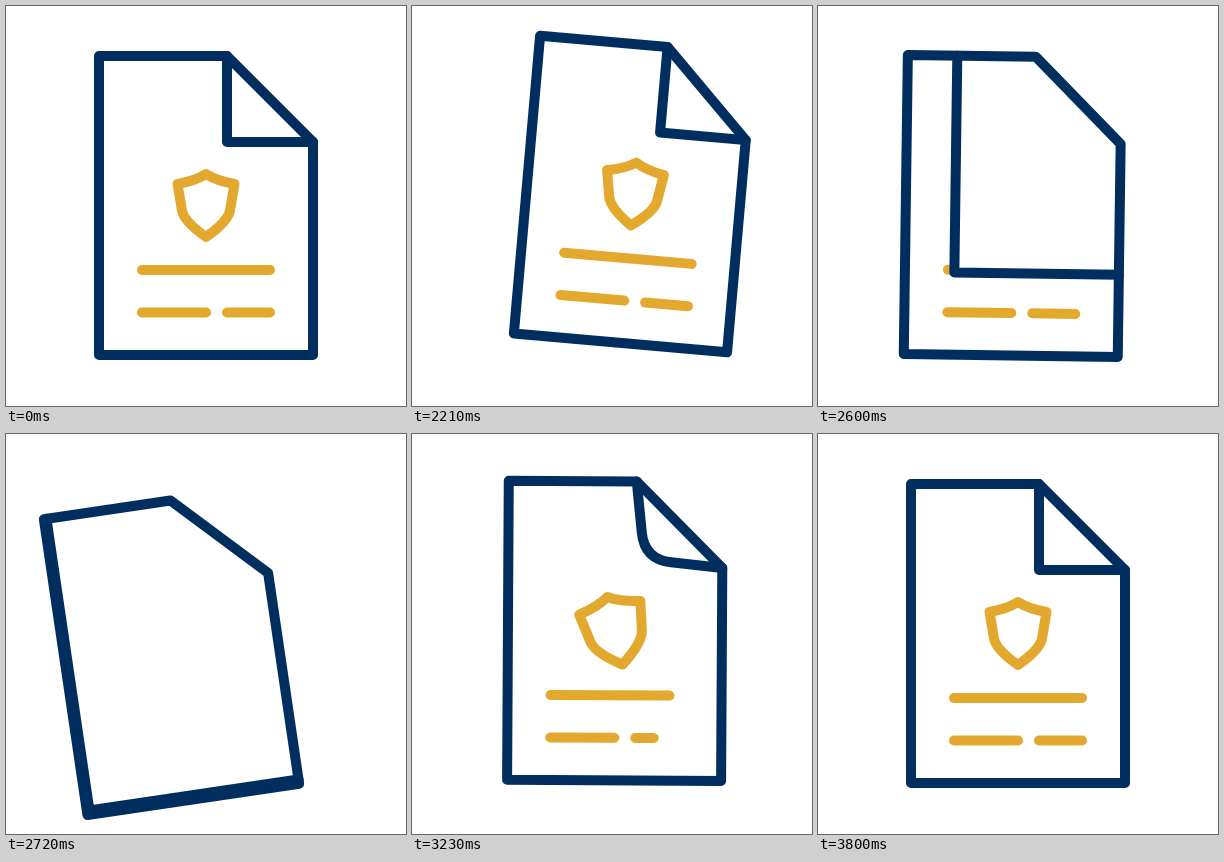
Animation, 400 px wide and 400 px high, one loop 3860 ms. Source, as an HTML page with a canvas:

```html
<!DOCTYPE html>
<html lang="en">
<head>
<meta charset="utf-8">
<title>Document turning a page</title>
<style>
html, body { margin: 0; width: 100%; height: 100%; overflow: hidden; background: #fff; }
canvas { display: block; width: 400px; height: 400px; }
</style>
</head>
<body>
<canvas width="400" height="400"></canvas>
<script>
const ctx = document.querySelector('canvas').getContext('2d');
const NAVY = '#002e5f', GOLD = '#e2a92e';
const LOOP = 3860, START = 2000, STEP = 30, LAST = 60;
const TURN = 25; // step at which the flap has covered the old page
const WRITE_START = 24.3, WRITE_STEPS = 21.7;

// Keys are [step, value] pairs, eased in and out between neighbours.
const KEYS = {
  x: [[0, 0], [13.3, 40], [25.3, -37], [29.7, -37], [46, 14.5], [60, 0]],
  y: [[0, 0], [13.6, -22], [26, 21], [29.7, 21], [45.5, -8.5], [60, 0]],
  angle: [[0, 0], [14.4, 10.5], [26, -10], [31, -10], [46.5, 4.5], [60, 0]],
  cover: [[13.2, 0], [25, 1]],
  fold: [[28, 0], [46, 1]],
  shieldScale: [[25, 0], [34, 1.1], [40, 1.1], [54, 1]],
  shieldAngle: [[32, 0], [40, -14], [48, 10], [56, 0]]
};

const clamp = v => Math.min(1, Math.max(0, v));
const mix = (a, b, p) => a + (b - a) * p;
const smooth = u => u * u * (3 - 2 * u);
const radians = deg => deg * Math.PI / 180;

function at(name, step) {
  const keys = KEYS[name];
  let value = keys[0][1];
  for (let i = 1; i < keys.length; i++) {
    const [a, from] = keys[i - 1], [b, to] = keys[i];
    if (step >= a) value = mix(from, to, smooth(clamp((step - a) / (b - a))));
  }
  return value;
}

function stroke(path, color) {
  ctx.strokeStyle = color;
  ctx.stroke(new Path2D(path));
}

function bar(x, y, length) {
  if (length > 0) stroke(`M${x} ${y}h${length}`, GOLD);
}

function shield(scale, angle) {
  if (scale <= 0) return;
  ctx.save();
  ctx.translate(200, 199.5);
  ctx.rotate(radians(angle));
  ctx.scale(scale, scale);
  ctx.lineWidth = 10 / scale;
  stroke('M0-31.5Q-11-24.5-28.5-21.5L-24 5Q-22 16 0 31.5Q22 16 24 5L28.5-21.5Q11-24.5 0-31.5Z', GOLD);
  ctx.restore();
}

function flap(edge) {
  ctx.fillStyle = '#fff';
  ctx.fill(new Path2D(edge + 'L307 136L221 50Z'));
  stroke(edge, NAVY);
}

// The square flap grows until its corner meets the page's far corner.
function coverEdge(p) {
  const x = mix(221, 93, p), y = mix(136, 349, p);
  return `M${x} 50V${y}H307`;
}

// The new flap bulges out from the diagonal and sharpens into a corner.
function foldEdge(p) {
  const kx = mix(264, 221, p), ky = mix(93, 136, p), r = p * p;
  return `M221 50L${mix(221, kx, r)} ${mix(50, ky, r)}` +
    `Q${kx} ${ky} ${mix(307, kx, r)} ${mix(136, ky, r)}L307 136`;
}

function draw(step) {
  const fresh = step >= TURN;
  const drawn = fresh ? clamp((step - WRITE_START) / WRITE_STEPS) : 1;
  const written = 107 * drawn;

  ctx.setTransform(1, 0, 0, 1, 0, 0);
  ctx.fillStyle = '#fff';
  ctx.fillRect(0, 0, 400, 400);
  ctx.translate(200 + at('x', step), 199.5 + at('y', step));
  ctx.rotate(radians(at('angle', step)));
  ctx.translate(-200, -199.5);
  ctx.lineWidth = 10;
  ctx.lineCap = ctx.lineJoin = 'round';

  shield(fresh ? at('shieldScale', step) : 1, at('shieldAngle', step));
  bar(136, 264, 128 * (1 - (1 - drawn) ** 1.8));
  bar(136, 306.5, Math.min(64, written));
  bar(221, 306.5, written - 64);
  flap(fresh ? foldEdge(at('fold', step)) : coverEdge(at('cover', step)));
  stroke('M221 50H93V349H307V136Z', NAVY);
}

const origin = performance.now();
function tick() {
  const time = (performance.now() - origin) % LOOP;
  draw(Math.min(LAST, Math.max(0, Math.floor((time - START) / STEP))));
  requestAnimationFrame(tick);
}
tick();
</script>
</body>
</html>
```
